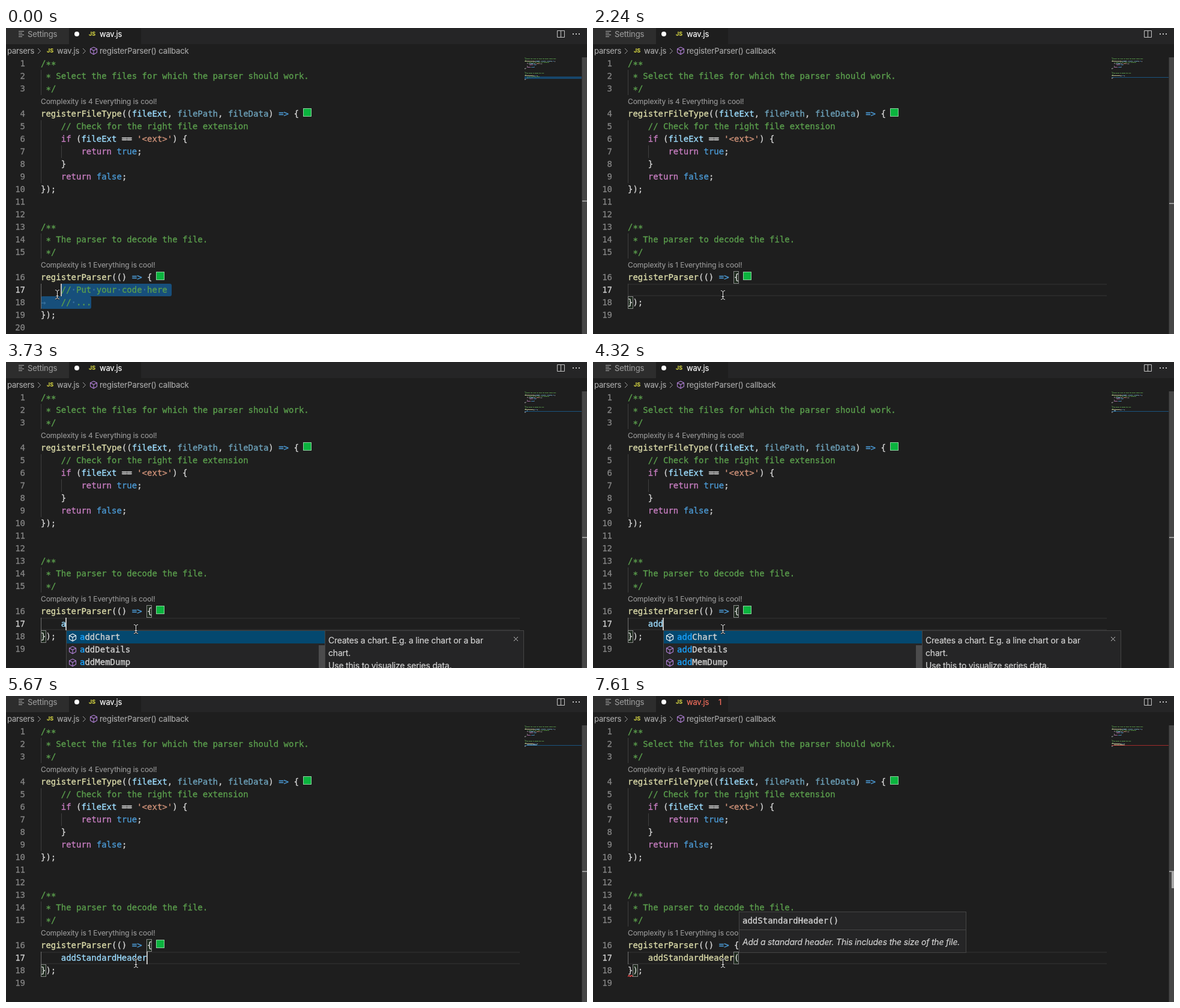
Animation of 968 by 511 pixels, one loop 8000 ms. Source, as an HTML page:

```html
<!DOCTYPE html>
<html lang="en">
<head>
<meta charset="utf-8">
<title>Editor typing</title>
<style>
html, body { margin: 0; width: 100%; height: 100%; overflow: hidden; background: #1e1e1e; }
#stage { position: relative; width: 968px; height: 511px; overflow: hidden; background: #1e1e1e; }
#stage div, #stage svg { position: absolute; box-sizing: border-box; }
.code { font: 14px/21px "DejaVu Sans Mono", monospace; color: #d4d4d4; white-space: pre; -webkit-text-stroke: .3px; }
.ui { font: 13px/20px Inter, sans-serif; letter-spacing: -.1px; color: #a9a9a9; white-space: pre; -webkit-text-stroke: .15px; }
.lens { font-size: 12px; letter-spacing: -.05px; color: #999; }
.js { font-size: 9px; font-weight: 700; color: #cbcb41; letter-spacing: 0; }
.doc { font-size: 14px; line-height: 21px; letter-spacing: -.2px; color: #d4d4d4; }
.num { width: 32px; left: 0; text-align: right; color: #858585; }
.num.on { color: #d0d0d0; }
.comment { color: #5b9f4d; }
.fn { color: #dcdcaa; }
.var { color: #9cdcfe; }
.dim { color: #6ea3bc; }
.key { color: #c97fc3; }
.lit { color: #4c9cd8; }
.str { color: #ce9178; }
.ws { color: #3b74a0; }
.hit { color: #18a3ff; }
.eq { text-shadow: .7px 0, -.7px 0; }
.star { position: relative; top: 1.5px; }
.box { background: #1e2a1e; border: 1px solid #888; width: 9px; height: 21px; }
.panel { background: #252526; border: 1px solid #454545; }
.sel { background: #174f7b; border-radius: 3px; height: 21px; }
#mini { left: 864px; top: 49px; transform-origin: 0 0; transform: scale(.1186, .0952); -webkit-text-stroke: 2px; }
</style>
</head>
<body>
<div id="stage"></div>
<script>
const CHAR = 8.428, LEFT = 58, ROW = 21, INDENT = 4;
const LOOP = 8000;
const stage = document.getElementById('stage');

const head = `/**
 * Select the files for which the parser should work.
 */
registerFileType((fileExt, filePath, fileData) => {
    // Check for the right file extension
    if (fileExt == '<ext>') {
        return true;
    }
    return false;
});


/**
 * The parser to decode the file.
 */
registerParser(() => {`.split('\n');
const selected = ['    //·Put·your·code·here', '→   //·...'];

const typing = [[0, ''], [3580, 'a'], [4020, 'ad'], [4320, 'add'], [4620, 'addS'],
  [5670, 'addStandardHeader'], [7010, 'addStandardHeader(']];
const mouse = [[0, [85, 445]], [440, [101, 445]], [590, [216, 446]]];
const blinks = [440, 1040, 1490, 1640, 2240, 2680, 3130, 3580, 5220, 5670, 6270, 6720, 7610];
const changes = [...blinks, 590, 1790, 3730, 4020, 4320, 4620, 7010, 7160, 7460];

const pick = (list, t) => list.filter(e => e[0] <= t).pop()[1];
const colX = col => LEFT + col * CHAR;
const lineY = n => 49 + ROW * (n - 1 + (n >= 4) + (n >= 16));
const esc = s => s.replace(/&/g, '&amp;').replace(/</g, '&lt;');
const span = (cls, s) => `<span class="${cls}">${esc(s)}</span>`;

const rect = (x, y, w, h, color, cls = '') =>
  `<div class="${cls}" style="left:${x}px;top:${y}px;width:${w}px;height:${h}px;${color ? 'background:' + color : ''}"></div>`;
const box = (col, line) => `<div class="box" style="left:${colX(col) - .5}px;top:${lineY(line)}px"></div>`;
const code = (x, y, html, cls = '') => `<div class="code ${cls}" style="left:${x}px;top:${y}px">${html}</div>`;
const label = (x, mid, s, cls = '', css = '') =>
  `<div class="ui ${cls}" style="left:${x}px;top:${mid - 10}px;${css}">${s}</div>`;
const icon = (x, y, w, h, d, color, width = 1) =>
  `<svg style="left:${x}px;top:${y}px" width="${w}" height="${h}" fill="none" stroke="${color}" stroke-width="${width}"><path d="${d}"/></svg>`;
const cube = (x, y, color) =>
  icon(x, y, 14, 14, 'M7 1 12.5 3.8V10L7 13 1.5 10V3.8ZM1.5 3.8 7 6.8 12.5 3.8M7 6.8V13', color, 1.1);
const chevron = x => icon(x, 33, 7, 11, 'M1 1 5.5 5.5 1 10', '#a0a0a0');

const rules = [
  ['str', /^'.*?'/], ['key', /^(if|return)\b/], ['lit', /^(true|false|=>)/], ['eq', /^==/],
  ['fn', /^\w+(?=\()/], ['dim', /^file(Path|Data)/], ['var', /^\w+/], ['', /^(\s+|.)/],
];

function paint(line) {
  if (/^[→\s]*[/*]/.test(line)) {
    const body = esc(line).replace(/\*/g, '<span class="star">*</span>')
      .replace(/[·→]/g, '<span class="ws">$&</span>');
    return `<span class="comment">${body}</span>`;
  }
  let out = '';
  while (line) {
    const [cls, re] = rules.find(r => r[1].test(line));
    const word = line.match(re)[0];
    out += cls ? span(cls, word) : esc(word);
    line = line.slice(word.length);
  }
  return out;
}

function chrome(error) {
  const name = error ? '#f8705f' : '#fff';
  return rect(0, 0, 968, 27, '#252526') + rect(0, 0, 105, 27, '#2d2d2d') + rect(105, 0, 120, 27, '#1e1e1e')
    + icon(20, 4, 12, 12, 'M1 1.5H10M1 4.5H7M1 7.5H10M1 10.5H7', '#b0b0b0')
    + label(36, 10, 'Settings', '', 'color:#999')
    + rect(114, 6, 8, 8, '#fff;border-radius:50%')
    + label(138, 10, 'JS', 'js') + label(156, 10, 'wav.js', '', `color:${name};letter-spacing:-.2px`)
    + (error ? label(209, 10, '1', '', 'color:#f8705f') : '')
    + icon(918, 3, 14, 14, 'M.5 1.5H12.5V12.5H.5ZM6.5 1.5V12.5', '#c5c5c5')
    + [944, 949, 954].map(x => rect(x, 9, 2, 2, '#c5c5c5')).join('')
    + label(2, 38, 'parsers', '', 'letter-spacing:-.2px') + chevron(52)
    + label(68, 38, 'JS', 'js') + label(85, 38, 'wav.js', '', 'letter-spacing:-.2px') + chevron(127)
    + cube(138.5, 31, '#b180d7') + label(156, 38, 'registerParser() callback');
}

// Highlights the typed letters, in order, wherever they occur in the name.
function mark(name, typed) {
  let k = 0;
  return [...name].map(c =>
    k < typed.length && c.toLowerCase() === typed[k].toLowerCase() ? (k++, span('hit', c)) : c).join('');
}

function suggest(text) {
  const x = Math.round(colX(INDENT + text.length));
  const short = text === 'addS';
  const names = short ? ['addStandardHeader', 'addDetails'] : ['addChart', 'addDetails', 'addMemDump'];
  const info = short ? ['Add a standard header. This includes the', 'size of the file.']
    : ['Creates a chart. E.g. a line chart or a bar', 'chart.', 'Use this to visualize series data.'];
  let out = rect(x, 448, 432, short ? 44 : 90, '', 'panel') + rect(x + 1, 449, 430, ROW, '#04486f');
  names.forEach((name, i) => {
    const y = 449 + i * ROW;
    out += cube(x + 4, y + 4, i ? '#b180d7' : '#fff') + code(x + 23, y, mark(name, text));
  });
  if (!short) out += rect(x + 421, 473, 10, 40, '#4b4b4c');
  out += rect(x + 431, 448, 332, short ? 52 : 90, '', 'panel');
  info.forEach((s, i) => out += label(x + 437, 464 + i * ROW, s, 'doc'));
  return out + icon(x + 745, 458, 9, 9, 'M1 1 8 8M8 1 1 8', '#c5c5c5');
}

function hint() {
  return rect(243, 360, 379, 69, '', 'panel') + rect(244, 390, 377, 1, '#454545')
    + code(249, 365, 'addStandardHeader()')
    + label(249, 410, 'Add a standard header. This includes the size of the file.', 'doc', 'font-style:italic');
}

function render(t) {
  const cut = t >= 1640, call = t >= 7160, error = t >= 7460;
  const text = pick(typing, t);
  const lines = [...head, ...(cut ? [' '.repeat(INDENT) + text] : selected), '});', ''];
  let out = chrome(error);

  if (cut) {
    out += rect(LEFT, 427, 798, ROW, 'transparent;border:solid #292929;border-width:2px 0');
    if (call) out += box(21, 17) + box(1, 18);
    else if (t >= 1790) out += box(21, 16) + box(0, 18);
  } else {
    out += rect(92, 427, 184, ROW, '', 'sel') + rect(LEFT, 448, 84, ROW, '', 'sel');
  }

  const guides = [[0, 2, 2], [0, 5, 5], [4, 7, 1], [0, 14, 2], [0, 17, cut ? 1 : 2]];
  for (const [col, line, count] of guides) {
    const active = line === 17 && (!cut || text);
    out += rect(Math.round(colX(col)), lineY(line), 1, count * ROW, active ? '#707070' : '#404040');
  }

  const painted = lines.map(paint);
  painted.forEach((html, i) => {
    const n = i + 1;
    out += code(0, lineY(n), n, n === 17 ? 'num on' : 'num') + code(LEFT, lineY(n), html);
  });
  out += label(LEFT, 123, 'Complexity is 4 Everything is cool!', 'lens')
    + label(LEFT, 396, 'Complexity is 1 Everything is cool!', 'lens');
  for (const [x, y] of [[495, 134], [250, 407]]) out += rect(x, y, 14, 14, '#0bb43e;border:1px solid #8fd0a0');

  out += (cut ? rect(864, 82, 95, 1, error ? '#a02c2c' : '#1a5480') : rect(864, 81, 95, 4, '#17466b'))
    + `<div id="mini" class="code">${painted.join('\n')}</div>`
    + rect(959, 49, 1, 462, '#303030') + rect(960, 49, 8, 462, '#464646')
    + rect(960, cut ? 292 : 288, 8, 2, '#9a9a9a');
  if (call) out += rect(964, 293, 4, 28, '#a8a8a8');
  if (error) out += icon(58, 465, 9, 5, 'M0 3.5 2 1.5 4 3.5 6 1.5 8 3.5', '#f14c4c', 1.3);

  if (blinks.filter(b => b <= t).length % 2 === 0) {
    out += rect(Math.round(colX(INDENT + text.length)) - 1, 427, 2, ROW, '#c0c0bf');
  }
  if (t >= 3730 && t < 5670) out += suggest(text);
  if (error) out += hint();

  const [mx, my] = pick(mouse, t);
  const beam = 'M2 1.5Q5 1.5 5.5 4Q6 1.5 9 1.5M5.5 4V14M2 16.5Q5 16.5 5.5 14Q6 16.5 9 16.5M3.5 11.5H7.5';
  out += icon(mx - 5, my - 9, 11, 18, beam, '#111', 2.4) + icon(mx - 5, my - 9, 11, 18, beam, '#f2f2f2', 1);
  stage.innerHTML = out;
}

let shown = -1;
function tick() {
  const t = performance.now() % LOOP;
  const step = changes.filter(c => c <= t).length;
  if (step !== shown) render(t);
  shown = step;
  requestAnimationFrame(tick);
}
tick();
</script>
</body>
</html>
```
